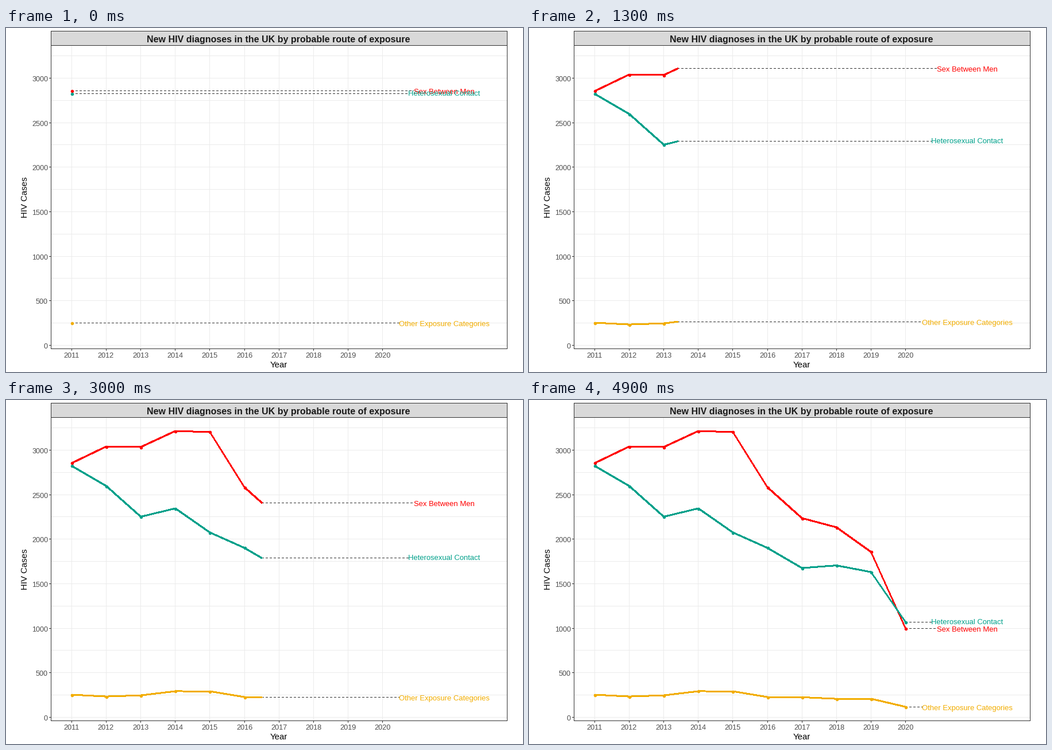
These frames come from a looping animation (900x600 px, 10000 ms). A matplotlib script:

```python
import numpy as np
import matplotlib.pyplot as plt
from matplotlib.animation import FuncAnimation
from matplotlib.collections import LineCollection
from matplotlib.patches import Rectangle

W, H, DPI = 900, 600, 100
PT = 72 / DPI                      # points per pixel
FRAMES, INTERVAL, LAST = 100, 100, 49
LEFT, RIGHT, TOP, MID, BOTTOM = 78.5, 872.5, 5.5, 30.5, 559.5
DARK, GRID, TICK_TEXT = "#333333", "#EBEBEB", "#4D4D4D"

# name, colour, label start, label baseline offset, yearly values
SERIES = [
    ("Sex Between Men", "#FF0000", 710, 6,
     [2854, 3040, 3034, 3214, 3202, 2583, 2236, 2133, 1857, 1000]),
    ("Heterosexual Contact", "#00A08A", 701, 4,
     [2822, 2596, 2252, 2345, 2075, 1902, 1676, 1705, 1631, 1071]),
    ("Other Exposure Categories", "#F2AD00", 685, 6,
     [254, 234, 247, 293, 292, 228, 226, 208, 209, 118]),
]
YEARS = np.arange(10)
KEYS = np.round(YEARS * LAST / 9)  # frame at which each year is reached


def px(year):
    return 114.5 + 60.1 * year


def py(value):
    return 553.5 - 0.1554 * value


def mid(v):
    return np.floor(v) + 0.5


plt.rcParams["font.family"] = "Liberation Sans"
fig = plt.figure(figsize=(W / DPI, H / DPI), dpi=DPI, facecolor="white")
ax = fig.add_axes([0, 0, 1, 1])
ax.set(xlim=(0, W), ylim=(H, 0))
ax.axis("off")


def rule(x0, y0, x1, y1, color, z=1):
    ax.plot([x0, x1], [y0, y1], color=color, lw=PT, antialiased=False,
            snap=False, solid_capstyle="butt", zorder=z)


def box(y0, y1, fill, z):
    ax.add_patch(Rectangle((LEFT, y0), RIGHT - LEFT, y1 - y0, facecolor=fill,
                           edgecolor=DARK, lw=PT, antialiased=False,
                           snap=False, zorder=z))


def write(x, y, s, size, color="black", ha="center", **kw):
    return ax.text(x, y, s, fontsize=size * PT, color=color, ha=ha,
                   va="baseline", **kw)


# Panel, grid and axes
for v in range(0, 3251, 250):
    y = mid(py(v))
    rule(LEFT, y, RIGHT, y, GRID)
    if v % 500 == 0:
        rule(75, y, 78, y, DARK)
        write(73, y + 5.5, str(v), 12.6, TICK_TEXT, "right")
for k in YEARS:
    x = mid(px(k))
    rule(x, MID, x, BOTTOM, GRID)
    rule(x, 560, x, 563, DARK)
    write(x - 0.5, 575, str(2011 + k), 12.6, TICK_TEXT)
box(MID, BOTTOM, "none", 8)
box(TOP, MID, "#D9D9D9", 9)
write(474.5, 25, "New HIV diagnoses in the UK by probable route of exposure", 16,
      "#1A1A1A", weight="bold", zorder=10)
write(475, 592, "Year", 15)
ax.text(40, 295, "HIV Cases", fontsize=15 * PT, rotation=90, ha="right",
        va="center")

# Moving parts
parts = []
for name, color, start, drop, values in SERIES:
    lines = LineCollection([], colors=color, antialiaseds=False, zorder=4,
                           capstyle="round")
    ax.add_collection(lines, autolim=False)
    dash, = ax.plot([], [], color=DARK, lw=PT, ls=(0, (4, 4)), snap=False,
                    antialiased=False, dash_capstyle="butt", zorder=3)
    dots, = ax.plot([], [], "o", color=color, ms=5.6 * PT, mew=0,
                    antialiased=False, zorder=5)
    label = write(start - 0.5, 0, name, 13, color, "left", zorder=6)
    parts.append((lines, dash, dots, label, start, drop, np.array(values)))


def update(i):
    n = min(i, LAST)
    now = np.interp(n, KEYS, YEARS)
    done = int(np.sum(KEYS <= n))
    for lines, dash, dots, label, start, drop, values in parts:
        tip = py(np.interp(now, YEARS, values))
        xs, ys = px(YEARS[:done]), py(values[:done])
        path = np.column_stack([np.append(xs, px(now)), np.append(ys, tip)])
        segs = np.stack([path[:-1], path[1:]], axis=1)
        run = np.abs(segs[:, 1] - segs[:, 0])
        steep = run[:, 1] > run[:, 0]
        lines.set_segments(segs)
        lines.set_linewidths(np.where(steep, 1.4, 2) * PT)
        dots.set_data(mid(xs), mid(ys))
        dash.set_data([np.floor(px(now)), start], [mid(tip)] * 2)
        label.set_y(np.floor(tip) + drop)
    return [a for p in parts for a in p[:4]]


anim = FuncAnimation(fig, update, frames=FRAMES, interval=INTERVAL,
                     init_func=lambda: update(0), repeat=True, repeat_delay=0)
plt.show()
```
